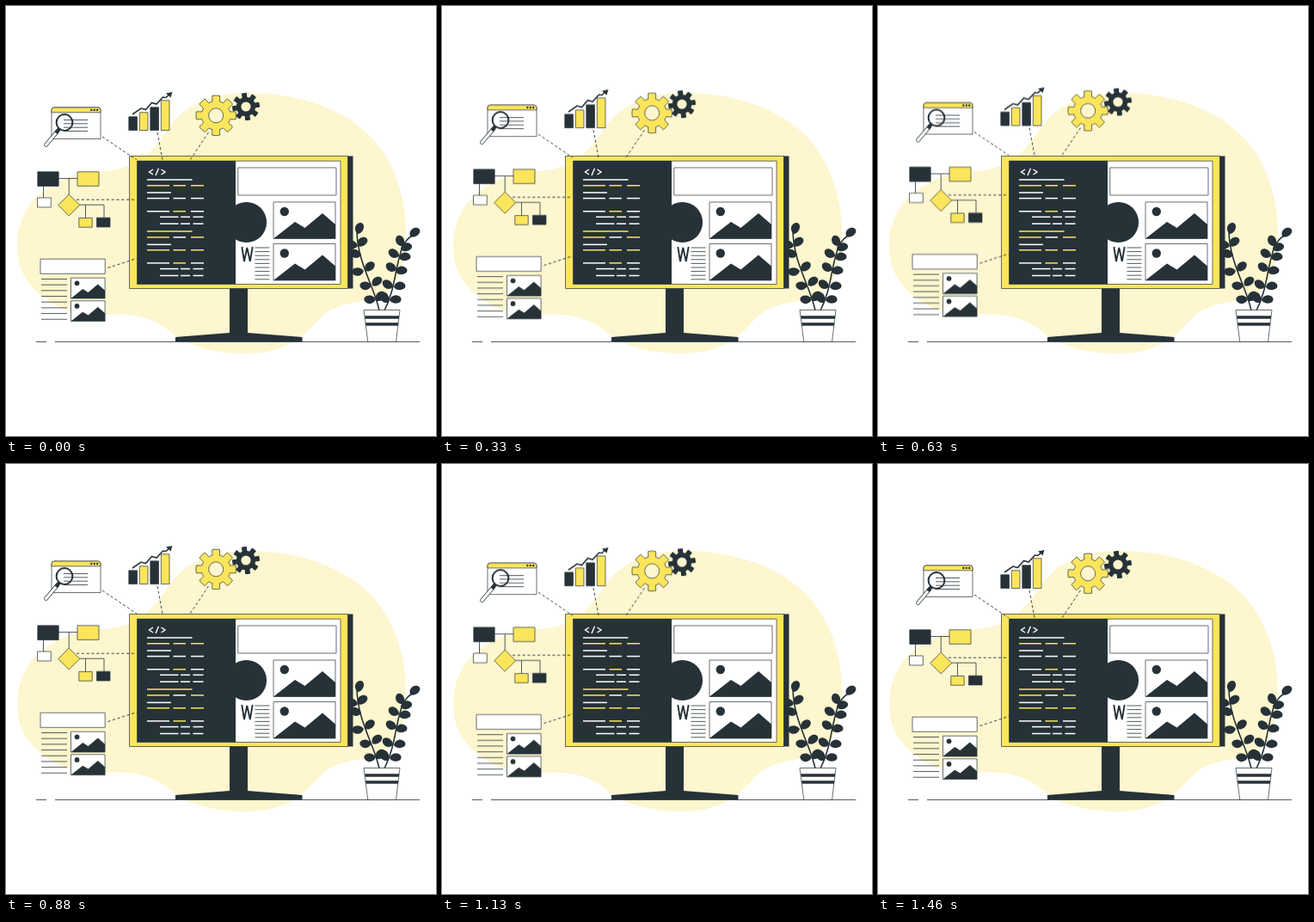
An HTML page for the animation above (1500 ms loop, 500x500 px).

```html
<!DOCTYPE html>
<html lang="en">
<head>
<meta charset="utf-8">
<title>Web development</title>
<style>
  html, body { margin: 0; width: 100%; height: 100%; overflow: hidden; background: #fff; }
  svg { display: block; width: 100vw; height: 100vh; }
  .d { fill: #263238; }
  .y { fill: #fbe55b; }
  .w { fill: #fff; }
  .c { fill: #fdf6ce; }
  .o { stroke: #263238; stroke-width: .7; vector-effect: non-scaling-stroke; }
  .l { fill: none; stroke: #263238; stroke-width: .8; }
  .dash { stroke-dasharray: 3.2 2.6; stroke-width: .9; }
  .code { fill: none; stroke-width: 1.5; }
  #float { animation: float 1500ms linear infinite; }
  @keyframes float {
    0%, 97.22%, 100% { transform: translateY(0); }
    48.61% { transform: translateY(-6.3px); }
  }
</style>
</head>
<body>
<svg viewBox="0 0 500 500">
  <defs>
    <g id="pic">
      <path class="w o" d="M0 0H72V42.5H0Z"/>
      <path class="d" d="M0 42.5 25 23 36.5 30 57 13 72 26V42.5Z"/>
      <circle class="d" cx="12.8" cy="11" r="5.2"/>
    </g>
    <path id="leaf" class="d" d="M0 0C2-5 7-6.500 11-4C14.500-1.500 14.500 2 11 3.800C7 5.500 2 4 0 0Z"/>
  </defs>

  <path class="c" d="M13 280C13 252 25 228 47 213C66 200 84 193 112 192C151 190 169 172 187 145C207 114 240 101 282 101C334 101 391 117 425 153C452 182 465 224 465 262C465 300 456 333 428 340C405 346 381 345 363 365C341 390 318 404 280 404C243 404 213 397 190 378C170 362 149 357 116 359C82 362 57 350 39 335C21 319 13 302 13 280Z"/>
  <path class="l" d="M35 390.500H47M57 390.500H481"/>

  <g id="plant">
    <path class="l" style="stroke-width:1.600" d="M434 354C428 325 409 300 408 262M440 354C452 330 452 310 458 290C460 280 464 272 472 267"/>
  </g>
  <path class="w o" d="M416 353.500H458L453.500 390.500H420.800Z"/>
  <path class="d" d="M417.200 360.200H457.200L456.800 363.800H417.600ZM418 368.200H456.200L455.800 371.800H418.500Z"/>

  <path class="d" d="M260 328H281V380L344.500 385V390.500H197V385L260 380Z"/>
  <path class="d" d="M397 174.500H403.500V328.500H397Z"/>
  <path class="y o" d="M143.500 174.500H397.500V328.500H143.500Z"/>
  <path class="w o" d="M152.500 180.200H389V323.500H152.500Z"/>
  <path class="d" d="M152.500 180H267V323.500H152.500Z"/>
  <circle class="d" cx="279.500" cy="251.500" r="23.600"/>
  <g id="code"></g>
  <path fill="none" stroke="#fff" stroke-width="1.400" d="M171 190 166.500 193 171 196M177.500 188.800 174 197M180.500 190 185 193 180.500 196"/>
  <path class="w o" d="M269.800 188H384V220H269.800Z"/>
  <use href="#pic" x="311" y="228"/>
  <use href="#pic" x="311" y="276.500"/>
  <path class="l" style="stroke-width:1.900" d="M274.300 280 277 297 280.300 281 283.800 297 286.700 280"/>
  <path id="copy" class="l"/>

  <g id="float">
    <path class="l dash" d="M112 152 152 179M176 147 182 179M235.500 147 214 179M82 225.200H151M118.500 304.500 152 293.500"/>

    <path class="w o" d="M53 154.500V121Q53 118 56 118H107Q110 118 110 121V154.500Z"/>
    <path class="y o" d="M53 123.800V121Q53 118 56 118H107Q110 118 110 121V123.800Z"/>
    <path class="d" id="dots"/>
    <path class="l" d="M67 132.500H95M67 136.800H95M67 141.200H95M67 145.500H95"/>
    <path class="l" stroke-linecap="round" style="stroke-width:4.800" d="M60 145.500 46.500 161.500"/>
    <path fill="none" stroke="#fff" stroke-width="3.400" stroke-linecap="round" d="M57.500 148.500 46.500 161.500"/>
    <path class="l" style="stroke-width:4" d="M62.300 142.300 58 147.500"/>
    <circle class="l" style="stroke-width:2" cx="68" cy="135.500" r="9.400"/>

    <path class="d o" d="M142.800 128.800H152.500V144.500H142.800ZM167.800 117.800H177.500V144.500H167.800Z"/>
    <path class="y o" d="M155.300 123.800H165V144.500H155.300ZM180.300 109.800H190V144.500H180.300Z"/>
    <path class="l" style="stroke-width:1.600" d="M147 126 157 119 162.500 120.500 169.500 112.500 175 114 182.500 106 186 106.500 190 102.500"/>
    <path class="d" d="M193.500 100 186 101.500 191.500 106.500Z"/>

    <path id="big" class="y o"/>
    <circle class="c o" cx="244.200" cy="127.300" r="8.500"/>
    <path id="small" class="d"/>
    <circle class="c" cx="279" cy="117" r="5.600"/>

    <path class="l" d="M61 200.500H83M73.200 200.500V219M43.500 209V223M85.500 231.200H114V246M92.500 231.200V246"/>
    <path class="d o" d="M36.800 192.800H61.200V209.500H36.800ZM105.500 246.200H121V257H105.500Z"/>
    <path class="y o" d="M83 192.800H108V209.300H83ZM84.800 246.500H100.200V257.200H84.800ZM73.200 219 85.800 231.500 73.200 244 60.800 231.500Z"/>
    <path class="w o" d="M36.500 223H52.300V234H36.500Z"/>

    <path class="w o" d="M40 294.200H115.200V311.300H40Z"/>
    <path id="notes" class="l"/>
    <use href="#pic" transform="translate(75.500 316.200) scale(.55 .56)"/>
    <use href="#pic" transform="translate(75.500 342.800) scale(.55 .56)"/>
  </g>
</svg>
<script>
  const $ = id => document.getElementById(id);

  const rows = (x1, x2, y, step, n) =>
    Array.from({ length: n }, (_, i) => `M${x1} ${y + i * step}H${x2}`).join('');
  $('copy').setAttribute('d', rows(289.5, 306.5, 281, 4.6, 9));
  $('notes').setAttribute('d', rows(41, 71, 317.5, 6.68, 8));
  $('dots').setAttribute('d', [99.3, 102.8, 106.2].map(x => `M${x - 1.2} 120.900a1.2 1.2 0 1 0 2.4 0a1.2 1.2 0 1 0-2.4 0`).join(''));

  // Eight teeth: root arc, flank, tip arc, flank
  function gear(cx, cy, root, tip, turn) {
    const at = (r, deg) => {
      const a = deg * Math.PI / 180;
      return `${(cx + r * Math.cos(a)).toFixed(2)} ${(cy + r * Math.sin(a)).toFixed(2)}`;
    };
    let d = '';
    for (let i = 0; i < 8; i++) {
      const a = i * 45 + turn;
      d += `${i ? `A${root} ${root} 0 0 1 ` : 'M'}${at(root, a - 15)}L${at(tip, a - 11)}`
        + `A${tip} ${tip} 0 0 1 ${at(tip, a + 11)}L${at(root, a + 15)}`;
    }
    return `${d}A${root} ${root} 0 0 1 ${at(root, turn - 15)}Z`;
  }
  $('big').setAttribute('d', gear(244.2, 127.3, 16.8, 23.3, 0));
  $('small').setAttribute('d', gear(279, 117, 11.2, 16, -8));

  // Code rows: y, layout, colour of each dash
  const layouts = {
    full: [[164, 216.5]],
    half: [[164, 192]],
    three: [[164, 190], [194.5, 209], [215, 230]],
    inset: [[179, 200.5], [203, 214], [217.5, 229.5]]
  };
  const ink = { w: '#fff', y: '#fbe55b' };
  $('code').innerHTML = [
    [202, 'full', 'w'], [208.8, 'three', 'yyy'], [217, 'half', 'w'], [223.6, 'three', 'www'],
    [238.8, 'three', 'wyw'], [245.3, 'inset', 'www'], [253.2, 'inset', 'www'],
    [262, 'full', 'y'], [268.9, 'three', 'ywy'], [277.4, 'half', 'w'], [283.8, 'three', 'yyy'],
    [298.9, 'three', 'wyw'], [305.6, 'inset', 'www'], [313.5, 'inset', 'www']
  ].map(([y, kind, tint]) => layouts[kind].map(([a, b], i) =>
    `<path class="code" stroke="${ink[tint[i]]}" d="M${a} ${y}H${b}"/>`).join('')).join('');

  // Leaves: base x, base y, direction
  $('plant').innerHTML += [
    [409, 265, -72], [409, 279, -40], [409, 279, 195], [413, 290, 200], [418, 308, -45],
    [416, 308, 175], [426, 325, -40], [425, 325, 180], [431, 343, -50], [430, 341, 180],
    [470, 268, -40], [462, 279, -120], [459, 283, -20], [457, 291, -150], [457, 293, -10],
    [454, 307, -150], [453, 309, -10], [450, 327, -150], [451, 327, -10], [444, 345, -120],
    [446, 342, -5]
  ].map(([x, y, a]) => `<use href="#leaf" transform="translate(${x} ${y}) rotate(${a})"/>`).join('');
</script>
</body>
</html>
```
